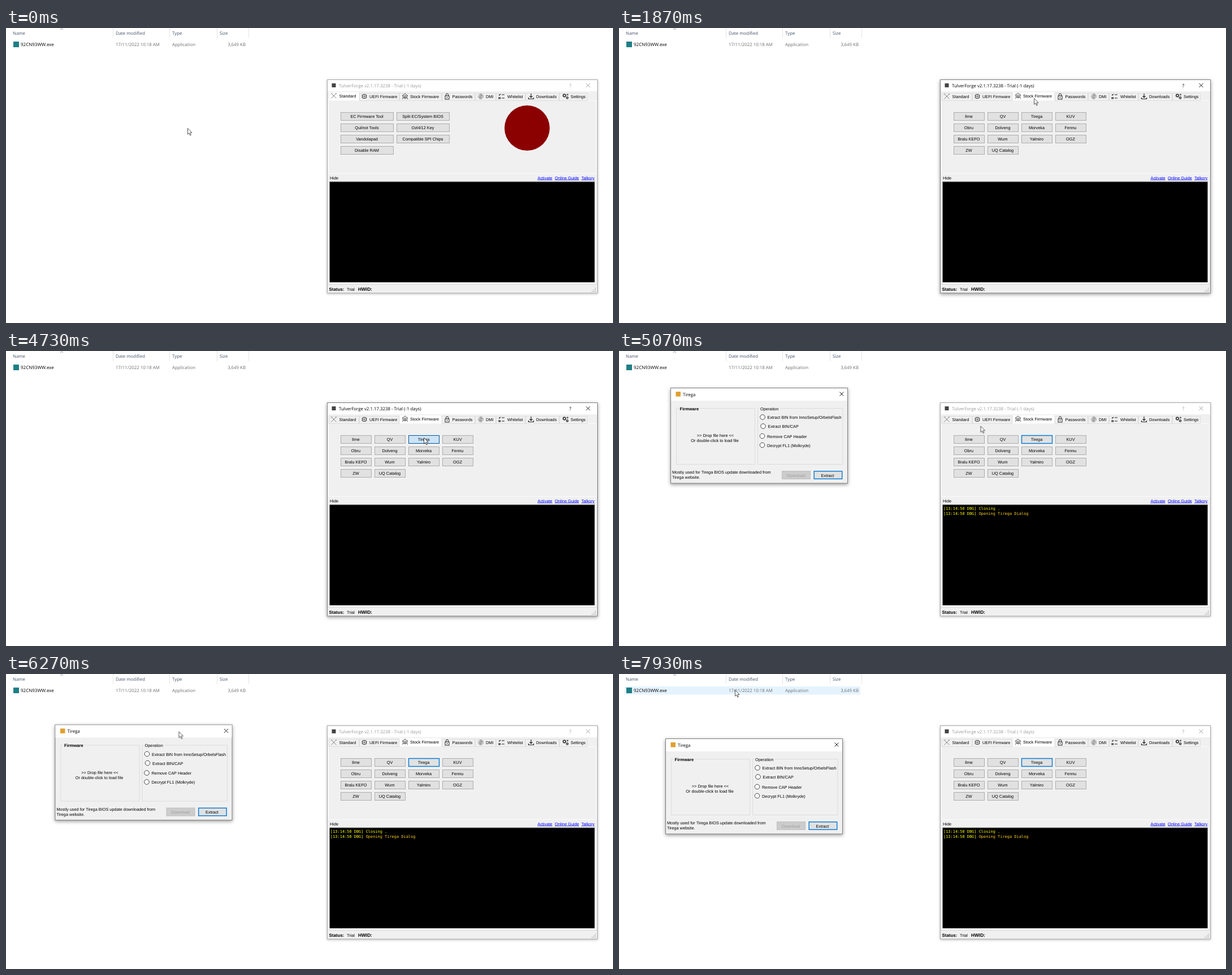
These frames come from a looping animation (1074 px wide and 522 px high, 8 s). An HTML page:

```html
<!DOCTYPE html>
<html lang="en">
<head>
<meta charset="utf-8">
<title>Firmware tool walkthrough</title>
<style>
  html, body { margin: 0; width: 100%; height: 100%; overflow: hidden; background: #fff; }
  svg { display: block; width: 1074px; height: 522px; }
  text { font: 7.35px "Liberation Sans", Arial, sans-serif; text-rendering: geometricPrecision; white-space: pre; }
  .ui, .ui text { font: 7.85px "Open Sans", "Noto Sans", sans-serif; }
  .bold { font-weight: bold; }
  .mid { text-anchor: middle; }
  .link { fill: #00f; text-decoration: underline; }
  .log { font: 6.95px "DejaVu Sans Mono", "Liberation Mono", monospace; fill: #ff0; }
  .btn rect { fill: #e1e1e1; stroke: #adadad; }
  .line { fill: none; stroke: #222; }

  /* 8 s loop = 120 ticks; one tick is 0.833 % */
  .anim { animation: 8s step-end -4ms infinite; }

  #cursor { animation-name: cursor; }
  @keyframes cursor {
    0%, 6.66%       { transform: translate(321px, 177px); animation-timing-function: steps(4); }
    10%             { transform: translate(425px, 148px); animation-timing-function: steps(4); }
    13.33%          { transform: translate(675px, 100px); animation-timing-function: steps(2); }
    15%             { transform: translate(731px, 117px); }
    15.83%, 17.5%   { transform: translate(735px, 128px); animation-timing-function: steps(2); }
    19.16%, 31.66%  { transform: translate(734px, 124px); animation-timing-function: steps(6); }
    36.66%, 38.33%  { transform: translate(739px, 159px); animation-timing-function: steps(2); }
    40%, 58.33%     { transform: translate(740px, 158px); animation-timing-function: step-end; }
    59.16%, 61.66%  { transform: translate(739px, 153px); animation-timing-function: steps(4); }
    65%             { transform: translate(540px, 112px); animation-timing-function: steps(5); }
    69.16%          { transform: translate(386px, 78px); animation-timing-function: steps(3); }
    71.66%          { transform: translate(340px, 77px); animation-timing-function: steps(3); }
    74.16%, 75%     { transform: translate(310px, 77px); animation-timing-function: steps(8); }
    81.66%, 83.33%  { transform: translate(301px, 126px); animation-timing-function: steps(5); }
    87.5%           { transform: translate(210px, 88px); animation-timing-function: steps(4); }
    90.83%          { transform: translate(90px, 33px); animation-timing-function: steps(3); }
    93.33%, 94.16%  { transform: translate(53px, 28px); animation-timing-function: steps(6); }
    99.16%, 100%    { transform: translate(205px, 28px); }
  }

  #row { animation-name: row; }
  @keyframes row { 0% { visibility: hidden; } 90.83%, 100% { visibility: visible; } }

  #main { animation-name: title; }
  @keyframes title { 0% { color: #999; } 22.5% { color: #000; } 60.83%, 100% { color: #999; } }
  #frame { animation-name: frame; }
  @keyframes frame {
    0%           { stroke: #aaa; filter: drop-shadow(0 1px 2px #0004); }
    22.5%        { stroke: #808080; filter: drop-shadow(0 2px 3px #0006); }
    60.83%, 100% { stroke: #aaa; filter: drop-shadow(0 1px 2px #0004); }
  }

  .before { animation-name: before; }
  @keyframes before { 0% { visibility: visible; } 23.33%, 100% { visibility: hidden; } }
  .after { animation-name: after; }
  @keyframes after { 0% { visibility: hidden; } 23.33%, 100% { visibility: visible; } }
  .lift-before { animation-name: liftBefore; }
  @keyframes liftBefore { 0% { transform: translateY(-1px); } 23.33%, 100% { transform: none; } }
  .lift-after { animation-name: liftAfter; }
  @keyframes liftAfter { 0% { transform: none; } 23.33%, 100% { transform: translateY(-1px); } }
  #hover { animation-name: hover; }
  @keyframes hover {
    0%     { visibility: hidden; }
    15%    { visibility: visible; }
    15.83% { visibility: hidden; }
    18.33% { visibility: visible; }
    23.33%, 100% { visibility: hidden; }
  }

  #pick rect { animation: pick 8s step-end -4ms infinite; }
  @keyframes pick {
    0%           { fill: #e1e1e1; stroke: #adadad; }
    35.83%       { fill: #e5f1fb; stroke: #0078d7; }
    59.16%       { fill: #cce4f7; stroke: #005499; }
    60.83%, 100% { fill: #e1e1e1; stroke: #0078d7; stroke-width: 1.4px; }
  }

  #ring { animation-name: ring; }
  @keyframes ring {
    0%           { r: 0; }
    42.5%        { r: 68px; animation-timing-function: steps(8); }
    49.16%, 100% { r: 0; }
  }
  #tip { animation-name: tip; }
  @keyframes tip {
    0%           { opacity: 0; }
    42.5%        { opacity: .2; animation-timing-function: steps(4); }
    45.83%       { opacity: 1; }
    59.16%, 100% { opacity: 0; }
  }

  .opened { animation-name: opened; }
  @keyframes opened { 0% { visibility: hidden; } 60.83%, 100% { visibility: visible; } }
  #drag { animation-name: drag; }
  @keyframes drag {
    0%, 75%       { transform: none; animation-timing-function: steps(8); }
    81.66%, 100%  { transform: translate(-9px, 49px); }
  }
</style>
</head>
<body>
<svg viewBox="0 0 1074 522">
  <!-- file list -->
  <g class="ui">
    <path class="line" style="stroke:#e5e5e5" d="M189.5 0V18M289.5 0V18M373.5 0V18M429.5 0V18"/>
    <path class="line" style="stroke:#777" stroke-width=".8" d="M96 3L98.500 .8L101 3"/>
    <g fill="#44546a">
      <text x="12" y="12">Name</text>
      <text x="194" y="12">Date modified</text>
      <text x="294" y="12">Type</text>
      <text x="378" y="12">Size</text>
    </g>
    <rect id="row" class="anim" x="10" y="22" width="417" height="14.500" fill="#e5f3ff"/>
    <rect x="13" y="24" width="10" height="10" fill="#1f7f86"/>
    <text x="26" y="32" style="font-size:8px">92CN93WW.exe</text>
    <g fill="#6d6d6d">
      <text x="194" y="32">17/11/2022 10:18 AM</text>
      <text x="294" y="32">Application</text>
      <text x="424" y="32" text-anchor="end">3,649 KB</text>
    </g>
  </g>

  <!-- main window -->
  <g id="main" class="anim">
    <rect id="frame" class="anim" x="568.500" y="91.500" width="478" height="377.500" fill="#f0f0f0"/>
    <rect x="569" y="92" width="477" height="20" fill="#fff"/>
    <rect x="576.500" y="98" width="7" height="7" fill="#444"/>
    <g class="ui" fill="currentColor">
      <text x="589" y="104.500">TulverForge v2.1.17.3238 - Trial (-1 days)</text>
      <text x="996.500" y="104.500" style="font-size:8.5px">?</text>
    </g>
    <path fill="none" stroke="currentColor" stroke-width=".9" d="M1026.500 98L1033.500 105M1033.500 98L1026.500 105"/>
  </g>
  <rect x="570.500" y="128.500" width="474" height="129" fill="#f0f0f0" stroke="#fafafa"/>
  <g id="tabs"></g>

  <g class="anim before">
    <g id="standard"></g>
    <circle cx="922" cy="177" r="40" fill="#8b0000"/>
  </g>
  <g id="stock" class="anim after"></g>

  <text x="573" y="267.500">Hide</text>
  <text class="link" x="940.500" y="267.500">Activate</text>
  <text class="link" x="971" y="267.500">Online Guide</text>
  <text class="link" x="1018" y="267.500">Talkory</text>
  <rect x="572.500" y="272" width="469" height="178" fill="#000"/>
  <path class="line" style="stroke:#8a8a8a" d="M572.500 450V272H1042"/>
  <path class="line" style="stroke:#fff" d="M572 450.500H1042.500V272"/>
  <g class="anim opened">
    <text class="log" x="574" y="280.500">[13:14:50 DBG] Closing .</text>
    <text class="log" x="574" y="289.500">[13:14:50 DBG] <tspan fill="#ffd21c">Opening Tirega Dialog</tspan></text>
  </g>
  <path class="line" style="stroke:#dcdcdc" d="M569 453.500H1046"/>
  <text class="bold" x="571.500" y="464.500" style="font-size:7.9px">Status:</text>
  <text x="603" y="464.500">Trial</text>
  <text class="bold" x="623" y="464.500" style="font-size:8.3px">HWID:</text>
  <path class="line" style="stroke:#a0a0a0" stroke-width="1.300" stroke-dasharray="1.300 1.500"
        d="M1042 460.500H1044M1039.200 463.300H1044M1036.500 466H1044"/>

  <!-- dialog -->
  <g class="anim opened">
    <g id="drag" class="anim">
      <rect x="91.500" y="65.500" width="313" height="168.500" fill="#f0f0f0" stroke="#808080"
            style="filter:drop-shadow(0 2px 3px #0006)"/>
      <rect x="92" y="66" width="312" height="22" fill="#fff"/>
      <rect x="100.500" y="72" width="8.500" height="8.500" fill="#e0a030"/>
      <text class="ui" x="113" y="79.500">Tirega</text>
      <path class="line" style="stroke:#000" stroke-width=".9" d="M390.500 72.500L397.500 79.500M397.500 72.500L390.500 79.500"/>
      <path class="line" style="stroke:#dcdcdc" d="M106 101.500H101.500V200.500H240.500V101.500H143M248 101.500H245.500V200.500H396V101.500H285"/>
      <text class="bold" x="107.500" y="104.500" style="font-size:7.6px">Firmware</text>
      <text x="250" y="104.500">Operation</text>
      <text class="mid" x="170.500" y="152">&gt;&gt; Drop file here &lt;&lt;</text>
      <text class="mid" x="169.500" y="161">Or double-click to load file</text>
      <g fill="#fff" stroke="#333" stroke-width=".9">
        <circle cx="254" cy="117" r="4.300"/>
        <circle cx="255" cy="133" r="4.300"/>
        <circle cx="253.500" cy="150.500" r="4.300"/>
        <circle cx="253.500" cy="166.500" r="4.300"/>
      </g>
      <text x="262.500" y="120">Extract BIN from InnoSetup/OrbelsFlash</text>
      <text x="263.500" y="136">Extract BIN/CAP</text>
      <text x="262" y="153.500">Remove CAP Header</text>
      <text x="262" y="169.500">Decrypt FL1 (Molkryde)</text>
      <text x="94" y="217">Mostly used for Tirega BIOS update downloaded from</text>
      <text x="94" y="226">Tirega website.</text>
      <rect x="288.500" y="212.500" width="50" height="14" fill="#ccc" stroke="#bfbfbf"/>
      <text class="mid" x="313" y="222.500" fill="#a0a0a0">Download</text>
      <rect x="345.200" y="212.700" width="49.500" height="13.600" fill="#e1e1e1" stroke="#0078d7" stroke-width="1.400"/>
      <text class="mid" x="369" y="222.500">Extract</text>
    </g>
  </g>

  <!-- pointer aids -->
  <g id="tip" class="anim">
    <rect x="739.500" y="171.500" width="213.500" height="13.500" fill="#fff" stroke="#8a8a8a"
          style="filter:drop-shadow(1px 1px 1px #0004)"/>
    <text class="mid" x="846" y="181" fill="#575757">Extract and edit firmware from Tirega Bios Update file.</text>
  </g>
  <circle id="ring" class="anim line" cx="739" cy="158.500" style="stroke:#808080" stroke-width="2"/>
  <path id="cursor" class="anim" d="M.5 .5V11.200L2.900 8.900L4.700 13L6.400 12.300L4.700 8.300H8Z"
        fill="#fff" stroke="#111" stroke-width=".7"/>
</svg>

<script>
  const byId = id => document.getElementById(id);

  const icons = {
    tools: '<path d="M-4.500-4.500L4.500 4.500M4.500-4.500L-4.500 4.500" stroke="#888"/><path d="M-5-2.500L-2.500-5M3-5L5-3" stroke="#999"/>',
    chip: '<rect x="-3.500" y="-3.500" width="7" height="7" rx="2"/><path d="M-2-1H2M-2 1H2M-4.500-1.500H-3.500M-4.500 1.500H-3.500M3.500-1.500H4.500M3.500 1.500H4.500" stroke-width=".8"/>',
    house: '<path d="M-5-1L0-5L5-1M-3.500-2V2.500H3.500V-2M0 2.500V5M-5 5L-3 2.500M5 5L3 2.500" stroke-width=".8"/><circle r="1.500" stroke-width=".8"/>',
    lock: '<rect x="-3.500" y="-1" width="7" height="6"/><path d="M-2-1V-3A2 2 0 0 1 2-3V-1M0 1V3"/>',
    print: '<circle r="4.500" stroke="#888" stroke-dasharray="3 1"/><circle r="2.500" stroke="#777"/><path d="M0-5V5M-3 3L3-3" stroke="#888"/>',
    list: '<path d="M-5-3L-4-2L-2-4M-5 2H-2.500V4H-5ZM0-3H5M0 3H5" stroke-width="1.200"/>',
    save: '<path d="M0-5V2M-2.500-.5L0 2L2.500-.5M-4.500 2V4.500H4.500V2" stroke-width="1.200"/>',
    gears: '<circle cx="-2" cy="-1.500" r="2.300" stroke-width="1.500"/><circle cx="3" cy="2.500" r="1.600" stroke-width="1.300"/><circle cx="3.500" cy="-3" r="1"/>'
  };

  // label, left edge, right edge, icon centre, text start
  const tabs = [
    ['Standard', 571, 625, 580, 589.5, 'tools', 'before'],
    ['UEFI Firmware', 625, 696, 634, 643, 'chip'],
    ['Stock Firmware', 696, 771, 706, 715, 'house', 'after'],
    ['Passwords', 771, 830, 780.5, 789.5, 'lock'],
    ['DMI', 830, 867, 840, 849, 'print'],
    ['Whitelist', 867, 919, 877, 887, 'list'],
    ['Downloads', 919, 979, 929, 938, 'save'],
    ['Settings', 979, 1029, 990, 999, 'gears']
  ];
  byId('tabs').innerHTML = tabs.map(([label, left, right, iconX, textX, icon, when]) => {
    const box = (y, look) =>
      `<rect x="${left + .5}" y="${y}" width="${right - left - 1}" height="${128.5 - y}" ${look}/>`;
    return box(115.5, 'fill="#f0f0f0" stroke="#dedede"') +
      (label.startsWith('Stock') ? box(115.5, 'id="hover" class="anim" fill="#d8eaf9" stroke="#dedede"') : '') +
      (when ? box(113.5, `class="anim ${when}" fill="#fff" stroke="#f4f4f4"`) : '') +
      `<g class="${when ? 'anim lift-' + when : ''}">
        <g class="line" transform="translate(${iconX} 121)">${icons[icon]}</g>
        <text x="${textX}" y="124">${label}</text></g>`;
  }).join('');

  function grid(id, columns, width, pitch, picked) {
    byId(id).innerHTML = columns.map((column, c) => column.map((label, r) => {
      const x = 592 + c * pitch, y = Math.round(149 + r * 20.1);
      return `<g class="btn" ${label === picked ? 'id="pick"' : ''}>
        <rect x="${x + .5}" y="${y + .5}" width="${width - 1}" height="14"/>
        <text class="mid" x="${x + width / 2 - .5}" y="${y + 10}">${label}</text></g>`;
    }).join('')).join('');
  }
  grid('standard', [
    ['EC Firmware Tool', 'Quilnot Tools', 'Vandolapad', 'Disable RAM'],
    ['Split EC/System BIOS', 'Ozl4/12 Key', 'Compatible SPI Chips']
  ], 94, 99);
  grid('stock', [
    ['Ilme', 'Obru', 'Bralu KEFO', 'ZW'],
    ['QV', 'Dolveng', 'Wurn', 'UQ Catalog'],
    ['Tirega', 'Morveka', 'Yalmiro'],
    ['KUV', 'Fennu', 'OGZ']
  ], 55, 60, 'Tirega');
</script>
</body>
</html>
```
